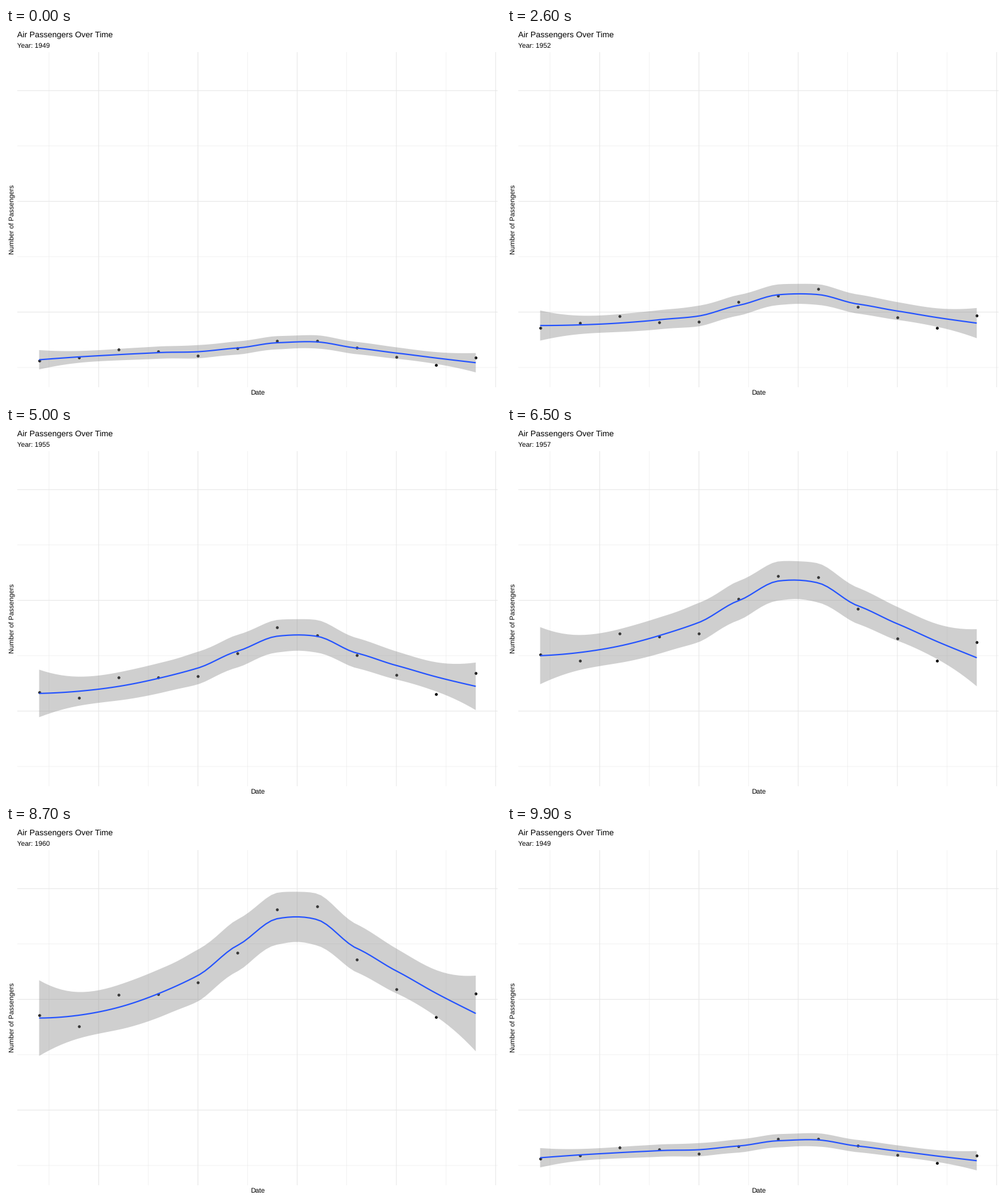
These frames come from a looping animation (800 by 600 pixels, 10000 ms). A matplotlib script:

```python
import numpy as np
import matplotlib.pyplot as plt
from matplotlib.animation import FuncAnimation
from matplotlib.patches import Polygon

plt.rcParams["font.family"] = "Liberation Sans"
plt.rcParams["text.hinting"] = "none"

W, H, DPI = 800, 600, 100
PX = 72 / DPI                       # points per pixel
LEFT, RIGHT, TOP, BOTTOM = 18.3, 794.5, 39, 581
GRID, BLUE, BAND = "#e7e7e7", "#2453ff", "#898989"

FIRST_YEAR = 1949
COUNTS = np.array([
    [112, 118, 132, 129, 121, 135, 148, 148, 136, 119, 104, 118],
    [115, 126, 141, 135, 125, 149, 170, 170, 158, 133, 114, 140],
    [145, 150, 178, 163, 172, 178, 199, 199, 184, 162, 146, 166],
    [171, 180, 193, 181, 183, 218, 230, 242, 209, 191, 172, 194],
    [196, 196, 236, 235, 229, 243, 264, 272, 237, 211, 180, 201],
    [204, 188, 235, 227, 234, 264, 302, 293, 259, 229, 203, 229],
    [242, 233, 267, 269, 270, 315, 364, 347, 312, 274, 237, 278],
    [284, 277, 317, 313, 318, 374, 413, 405, 355, 306, 271, 306],
    [315, 301, 356, 348, 355, 422, 465, 467, 404, 347, 305, 336],
    [340, 318, 362, 348, 363, 435, 491, 505, 404, 359, 310, 337],
    [360, 342, 406, 396, 420, 472, 548, 559, 463, 407, 362, 405],
    [417, 391, 419, 461, 472, 535, 622, 606, 508, 461, 390, 432],
], float)
YEARS = len(COUNTS)
MONTHS = np.arange(1.0, 13)
GRID_X = np.linspace(1, 12, 80)


def px(month):
    return LEFT + (np.asarray(month) - 0.45) * (RIGHT - LEFT) / 12.1


def py(count):
    return 549.0 - 0.8955 * (np.asarray(count) - 100)


# --- loess: local quadratics at knots, joined by cubic Hermite pieces ---
def local_fit(x0, near=9):
    """Rows that turn the data into the local value and slope at x0."""
    t = MONTHS - x0
    d = np.abs(t)
    w = np.sqrt(np.clip(1 - (d / np.sort(d)[near - 1]) ** 3, 0, None) ** 3)
    basis = np.stack([np.ones_like(t), t, t * t], axis=1)
    rows = np.linalg.pinv(basis * w[:, None]) * w
    return rows[0], rows[1]


KNOTS = np.concatenate([[0.945], np.arange(1, 12), [12.055]])
FITS = [local_fit(k) for k in KNOTS]


def smoother(xs):
    rows = []
    for x in xs:
        i = min(max(np.searchsorted(KNOTS, x, "right") - 1, 0), len(KNOTS) - 2)
        h = KNOTS[i + 1] - KNOTS[i]
        s = (x - KNOTS[i]) / h
        (v0, m0), (v1, m1) = FITS[i], FITS[i + 1]
        rows.append((1 - 3 * s**2 + 2 * s**3) * v0 + (3 * s**2 - 2 * s**3) * v1
                    + h * ((s**3 - 2 * s**2 + s) * m0 + (s**3 - s**2) * m1))
    return np.array(rows)


curve_op = smoother(GRID_X)
curves = COUNTS @ curve_op.T
spread = np.linalg.norm(COUNTS - COUNTS @ smoother(MONTHS).T, axis=1)
halves = np.outer(spread, np.linalg.norm(curve_op, axis=1))
# confidence factor, fixed by the band's half-width in January
halves *= 68.3 / (0.8 * halves[10, 0] + 0.2 * halves[11, 0])


# --- timeline: (from, to, fraction) for each frame ---
def timeline():
    steps = [(0, 0, 1.0)] * 3
    for a in range(YEARS):
        b = (a + 1) % YEARS
        n = 6 if a < 5 else 5
        steps += [(a, b, k / n) for k in range(1, n + 1)]
        if b:
            steps += [(b, b, 1.0)] * 3
    pick = np.round(np.linspace(0, len(steps) - 1, 100)).astype(int)
    return [steps[i] for i in pick]


STEPS = timeline()

# --- stage ---
fig = plt.figure(figsize=(W / DPI, H / DPI), dpi=DPI, facecolor="white")
ax = fig.add_axes([0, 0, 1, 1])
ax.set_xlim(0, W)
ax.set_ylim(H, 0)
ax.axis("off")


def rule(xs, ys, width):
    ax.plot(xs, ys, color=GRID, lw=width * PX, solid_capstyle="butt",
            snap=False, zorder=1)


def label(x, y, text, size, **kw):
    return ax.text(x, y, text, fontsize=size * PX, color="black",
                   va="baseline", **kw)


for width, months, counts in (
        (0.53, np.arange(1.25, 12, 2.5), (100, 300, 500)),
        (1.07, np.arange(2.5, 13, 2.5), (200, 400, 600))):
    for c in counts:
        rule([LEFT, RIGHT], [py(c)] * 2, width)
    for m in months:
        rule([px(m)] * 2, [TOP, BOTTOM], width)

label(LEFT, 15, "Air Passengers Over Time", 13.2)
subtitle = label(LEFT, 32.2, "", 11)
label((LEFT + RIGHT) / 2, 593.2, "Date", 11, ha="center")
label(13.5, (TOP + BOTTOM) / 2, "Number of Passengers", 11, ha="right",
      rotation=90, rotation_mode="anchor").set_ha("center")

dots, = ax.plot([], [], "o", color="black", ms=4.62 * PX, mew=0,
                snap=False, zorder=2)
band = Polygon(np.zeros((3, 2)), closed=True, fc=BAND, alpha=0.4, lw=0,
               ec="none", snap=False, zorder=3)
ax.add_patch(band)
line, = ax.plot([], [], color=BLUE, lw=2.13 * PX, solid_capstyle="butt",
                solid_joinstyle="round", snap=False, zorder=4)

X_DOTS, X_CURVE = px(MONTHS), px(GRID_X)
X_BAND = np.concatenate([X_CURVE, X_CURVE[::-1]])


def draw(i):
    a, b, f = STEPS[i]

    def mix(table):
        return (1 - f) * table[a] + f * table[b]

    mid, half = mix(curves), mix(halves)
    dots.set_data(X_DOTS, py(mix(COUNTS)))
    line.set_data(X_CURVE, py(mid))
    edge = np.concatenate([mid + half, (mid - half)[::-1]])
    band.set_xy(np.column_stack([X_BAND, py(edge)]))
    subtitle.set_text(f"Year: {FIRST_YEAR + b}")
    return dots, band, line, subtitle


anim = FuncAnimation(fig, draw, frames=len(STEPS), interval=100,
                     init_func=lambda: draw(0), repeat=True, repeat_delay=0)
plt.show()
```
